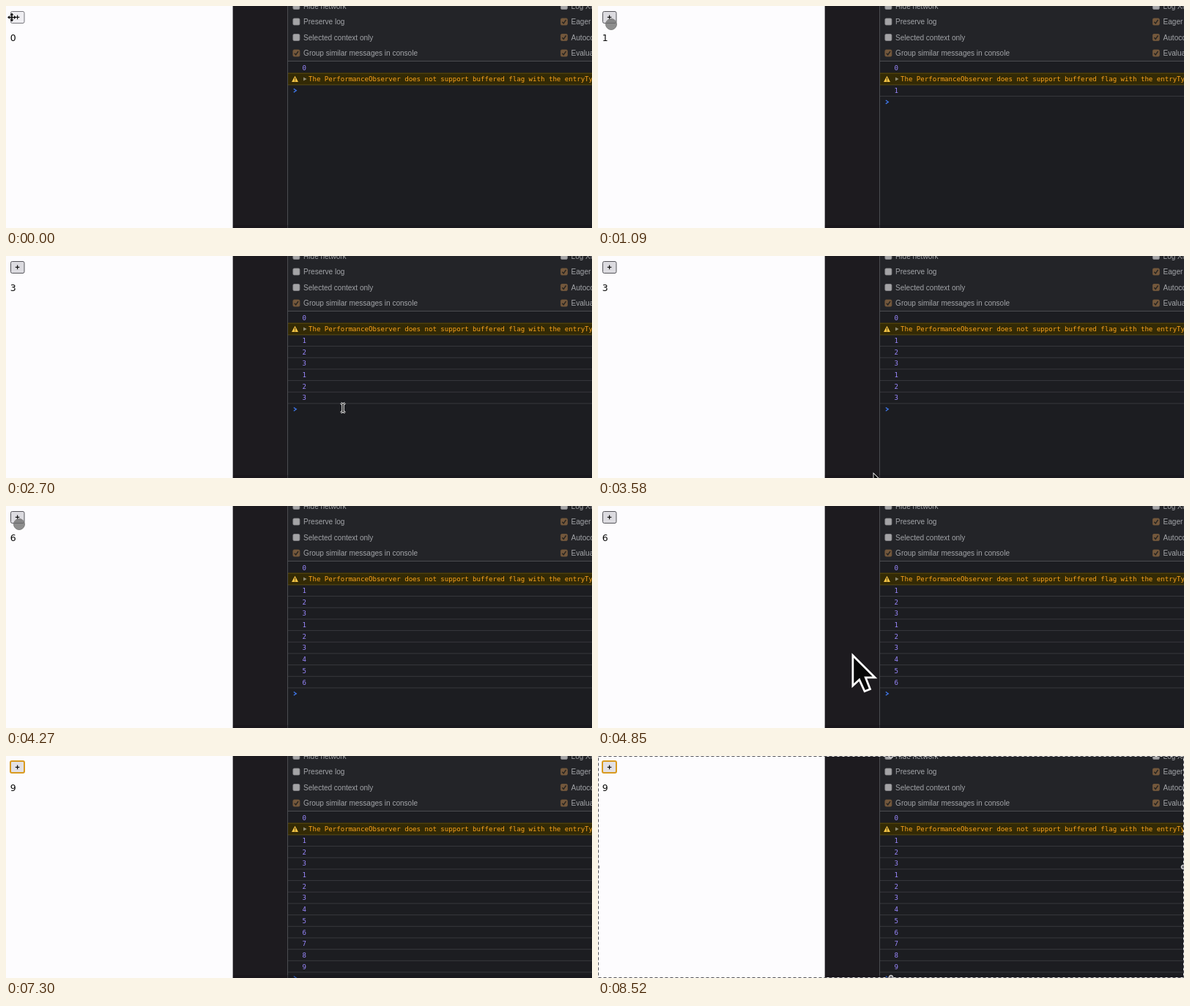
Animation, 800 px wide and 304 px high, one loop 8.56 s. Source, as an HTML page with a canvas:

```html
<!DOCTYPE html>
<html lang="en">
<head>
<meta charset="utf-8">
<title>Counter and console</title>
<style>
html, body { margin: 0; width: 100%; height: 100%; overflow: hidden; background: #1c1d21; }
canvas { display: block; width: 800px; height: 304px; }
</style>
</head>
<body>
<canvas id="stage" width="800" height="304"></canvas>
<script>
const ctx = document.getElementById('stage').getContext('2d');
const W = 800, H = 304, LOOP = 8560;
const PAGE_W = 309.5, PANEL_X = 384, CONSOLE_Y = 76;
const PITCH = 15.68, OPTION_PITCH = 21.5;
const LABEL = '10.02px "Liberation Sans", Arial, sans-serif';
const CODE = '9.08px "DejaVu Sans Mono", monospace';
const COUNT = '12.5px "DejaVu Sans", sans-serif';
const RING_AT = 7240, FRAME_AT = 7650, SHAKE_AT = 4850;

// Three rounds of three clicks; the first round is logged twice
const CLICK_GAP = 150, ECHO = 440;
const rounds = [960, 3920, 6420];
const clicks = rounds.flatMap(t => [0, 1, 2].map(i => t + i * CLICK_GAP));
const logs = clicks.map((at, i) => ({ at, n: i + 1 }));
logs.splice(3, 0, ...logs.slice(0, 3).map(({ at, n }) => ({ at: at + ECHO, n })));

// The pointer rests on the button in each round and wanders in between
const button = { x: 18, y: 25 };
const rest = t => [{ t: t - 100, ...button }, { t: t + 400, ...button }];
const stops = [
  { t: 300, x: 8, y: 16 },
  ...rest(rounds[0]),
  { t: 1940, x: 452, y: 200 }, { t: 2700, x: 460, y: 208 }, { t: 3580, x: 376, y: 297 },
  ...rest(rounds[1]),
  { t: SHAKE_AT, x: 347, y: 204 }, { t: 5730, x: 61, y: 38 },
  ...rest(rounds[2]),
  { t: 7220, x: 330, y: 320 }
];

const clamp = v => Math.max(0, Math.min(1, v));
const ease = p => p * p * (3 - 2 * p);

function box(x, y, w, h, color) {
  ctx.fillStyle = color;
  ctx.fillRect(x, y, w, h);
}

function rounded(x, y, w, h, r, fill, stroke, width = 1) {
  ctx.beginPath();
  ctx.roundRect(x, y, w, h, r);
  ctx.fillStyle = fill;
  ctx.fill();
  if (!stroke) return;
  ctx.strokeStyle = stroke;
  ctx.lineWidth = width;
  ctx.stroke();
}

function trace(points) {
  ctx.beginPath();
  points.forEach(([x, y]) => ctx.lineTo(x, y));
}

function line(points, color, width) {
  trace(points);
  ctx.strokeStyle = color;
  ctx.lineWidth = width;
  ctx.stroke();
}

function shape(points, color) {
  trace(points);
  ctx.closePath();
  ctx.fillStyle = color;
  ctx.fill();
}

function disc(x, y, r, fill, stroke) {
  rounded(x - r, y - r, 2 * r, 2 * r, r, fill, stroke);
}

function text(str, x, y, font, color) {
  ctx.font = font;
  ctx.fillStyle = color;
  ctx.fillText(str, x, y);
}

function at(x, y, scale, paint) {
  ctx.save();
  ctx.translate(x, y);
  ctx.scale(scale, scale);
  paint();
  ctx.restore();
}

function option(x, y, label, on) {
  rounded(x + .4, y - 4.5, 9, 9, 1.6, on ? '#74583c' : '#a4a4a6', on ? '#74583c' : '#8b8b8e', .8);
  if (on) line([[x + 2.3, y + .2], [x + 4.2, y + 2.3], [x + 7.5, y - 2.5]], '#262421', 1.4);
  text(label, x + 14.6, y + 3.5, LABEL, '#a2a4a8');
}

function page(t) {
  box(0, 0, PAGE_W, H, '#fdfcfe');
  const hover = (t >= rounds[0] && t < 5600) || t >= 6250;
  if (t >= RING_AT) rounded(6, 7, 19, 16, 2, '#e2e0e4', '#d99a20', 2);
  else rounded(6.5, 7.5, 18.5, 16, 2, hover ? '#dcdbe0' : '#efeef2', hover ? '#55545a' : '#77767c');
  line([[12.8, 15.4], [18.4, 15.4]], '#111', 1.2);
  line([[15.6, 12.6], [15.6, 18.2]], '#111', 1.2);
  text(clicks.filter(c => t >= c).length, 5.8, 48.4, COUNT, '#0a0a0a');
}

const rowTop = i => CONSOLE_Y + i * PITCH;

function rowLine(i, color = '#37383d') {
  box(PANEL_X + 1, rowTop(i), W, 1, color);
}

function logNumber(n, i) {
  text(n, 404.6, rowTop(i) + 11.7, CODE, '#9a88ff');
}

function warning() {
  const y = rowTop(1) + 8.4;
  box(PANEL_X + 1, rowTop(1), W, PITCH, '#332a05');
  rowLine(1, '#5c4b0c');
  rowLine(2, '#5c4b0c');
  shape([[394.5, y - 4.4], [399, y + 3.9], [390, y + 3.9]], '#f5c245');
  box(394, y - 1.7, 1, 3, '#332a05');
  box(394, y + 2.1, 1, 1, '#332a05');
  shape([[406, y - 2.5], [410.6, y], [406, y + 2.5]], '#8e8971');
  text('The PerformanceObserver does not support buffered flag with the entryType', 413, y + 3.3, CODE, '#ffa51c');
}

function panel(t) {
  box(PAGE_W, 0, W, H, '#1d1b1f');
  box(PANEL_X, 0, W, CONSOLE_Y, '#232428');
  box(PANEL_X, CONSOLE_Y, W, H, '#1c1d21');
  box(PANEL_X, 0, 1, H, '#4b4c50');
  box(PANEL_X, CONSOLE_Y - 1, W, 1, '#4b4c50');

  ['Hide network', 'Preserve log', 'Selected context only', 'Group similar messages in console']
    .forEach((s, i) => option(391.5, i * OPTION_PITCH, s, i === 3));
  ['Log XMLHttpRequests', 'Eager evaluation', 'Autocomplete from history', 'Evaluate triggers user activation']
    .forEach((s, i) => option(757, i * OPTION_PITCH, s, i > 0));

  logNumber(0, 0);
  warning();
  const shown = logs.filter(row => t >= row.at);
  shown.forEach(({ n }, i) => {
    logNumber(n, i + 2);
    rowLine(i + 3);
  });
  const y = rowTop(shown.length + 2) + 8.4;
  line([[392.8, y - 2.4], [396.3, y], [392.8, y + 2.4]], '#3f76e8', 1.3);
  box(PAGE_W, 300, W, 4, 'rgba(18,14,20,.25)');
}

function arrow(x, y, scale) {
  at(x, y, scale, () => {
    trace([[1.5, 4], [1.5, 39], [9.5, 31.5], [17, 48], [22, 46], [15.5, 29.5], [27, 29.5]]);
    ctx.closePath();
    ctx.lineWidth = 5.5;
    ctx.strokeStyle = '#fff';
    ctx.stroke();
    ctx.fillStyle = '#080808';
    ctx.fill();
  });
}

function beam(x, y) {
  for (const [color, width] of [['#f2f2f2', 3], ['#141414', 1]]) {
    for (const s of [-1, 1]) {
      line([[x + 3 * s, y - 6.5], [x, y - 4.8], [x, y + 4.8], [x + 3 * s, y + 6.5]], color, width);
    }
  }
}

function moveCross(x, y) {
  at(x, y, 1, () => {
    for (let i = 0; i < 4; i++) {
      line([[0, 0], [0, -4]], '#111', 1.5);
      shape([[0, -6], [2.5, -3], [-2.5, -3]], '#111');
      ctx.rotate(Math.PI / 2);
    }
  });
}

function pointer(t) {
  const next = stops.findIndex(s => s.t > t);
  if (next === 0) return moveCross(8, 15.6);
  if (next < 0) return;
  const a = stops[next - 1], b = stops[next];
  const p = ease((t - a.t) / (b.t - a.t));
  const shake = clamp(1.4 - Math.abs(t - SHAKE_AT) / 160);
  const x = a.x + (b.x - a.x) * p + 22 * shake * Math.sin((t - SHAKE_AT) / 30);
  const y = a.y + (b.y - a.y) * p;
  if (x < PAGE_W) disc(x, y, 7.5, 'rgba(110,110,110,.78)', '#818181');
  else if (x > PANEL_X && y > CONSOLE_Y) beam(x, y);
  else arrow(x, y, .32 + .68 * shake);
}

function selection() {
  for (const [color, dash] of [['#f4f4f4', []], ['#55545a', [4, 3]]]) {
    ctx.setLineDash(dash);
    ctx.strokeStyle = color;
    ctx.lineWidth = 1;
    ctx.strokeRect(.5, .5, W - 1, H - 1);
  }
  ctx.setLineDash([]);
  for (const [x, y] of [[W / 2, 0], [0, H / 2], [W - 1, H / 2], [W / 2, H - 1]]) {
    disc(x, y, 2.8, '#7d7c82', '#eee');
  }
}

const start = performance.now();

function draw(now) {
  const t = Math.max(0, now - start) % LOOP;
  panel(t);
  page(t);
  pointer(t);
  if (t >= FRAME_AT) selection();
  requestAnimationFrame(draw);
}

draw(start);
</script>
</body>
</html>
```
